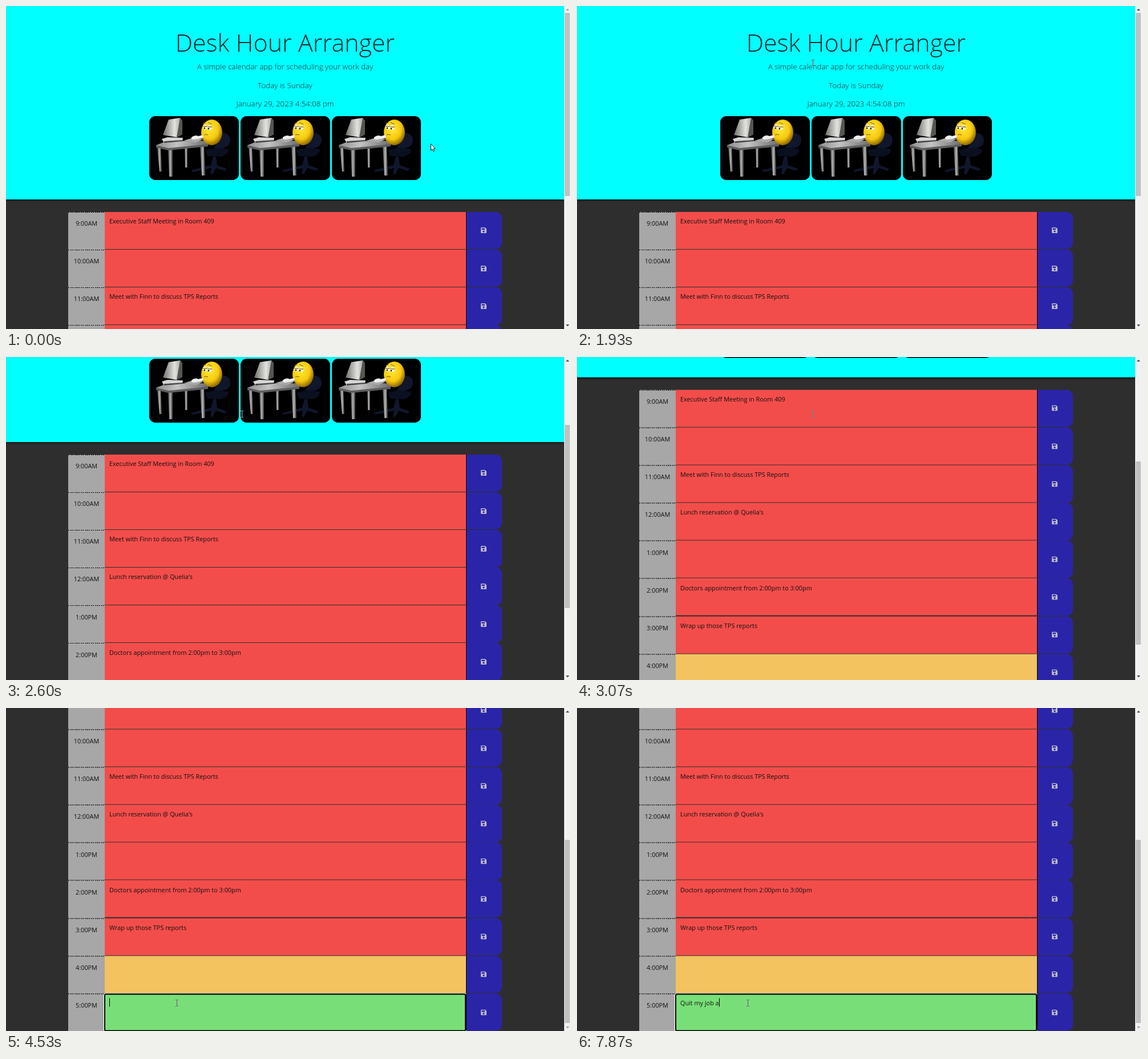
These frames come from a looping animation (990x566 px, 8000 ms). An HTML page:

```html
<!DOCTYPE html>
<html lang="en">
<head>
<meta charset="utf-8">
<title>Day planner</title>
<style>
  html, body { margin: 0; width: 100%; height: 100%; overflow: hidden; background: #2e2e2e; }
  #stage { position: relative; width: 990px; height: 566px; overflow: hidden; isolation: isolate;
    background: #2e2e2e; font: 10.85px/17px "Open Sans", "Noto Sans", sans-serif; color: #111; }
  #stage div, #stage svg { position: absolute; }
  #page { left: 0; top: 0; width: 978px; height: 956px; }
  #head { left: 0; top: 0; width: 978px; height: 339px; background: #0ff; text-align: center;
    box-shadow: 0 1px 4px #000c; color: #17242a; font-weight: 300; }
  #head div { width: 100%; white-space: pre; }
  .title { top: 34.3px; font-size: 43px; line-height: 60px; }
  .lead { font-size: 13.35px; line-height: 20px; }
  .pic { top: 193px; width: 156.5px; height: 112px; border-radius: 10.7px; background: #000; }
  .row { left: 109px; width: 760px; height: 66.14px; white-space: pre; }
  .hour { left: 0; top: 0; width: 64px; height: 100%; box-sizing: border-box; padding-top: 11.3px;
    background: repeating-linear-gradient(90deg, #000 0 2.2px, #0000 2.2px 3.6px) top / 100% 1px no-repeat #a7a7a7;
    text-align: center; }
  .note { left: 64px; top: 0; width: 633px; height: 65.1px; box-sizing: border-box; padding: 7.3px 8px; }
  .ring { left: 63px; top: 0; width: 634px; height: 66px; box-sizing: border-box;
    border: 2px solid #000; border-radius: 3px; box-shadow: 0 0 0 1px #fff; }
  .save { left: 697px; top: 0; width: 63px; height: 65.6px; box-sizing: border-box;
    background: #2a25a8; border-left: 1px solid #000; border-radius: 2px 10.7px 10.7px 2px; }
  .save svg { left: 25px; top: 27.8px; }
  .caret { position: absolute; width: 1px; height: 15px; margin-top: 1px; background: #000; }
  #bar { left: 978px; top: 0; width: 12px; height: 566px; background: #f1f1f1; }
  #thumb { left: 1.2px; width: 9.3px; height: 321px; background: #c1c1c1; }
  #bar svg { left: 0; top: 0; }
  .cursor { left: 0; top: 0; overflow: visible; }
  #beam { mix-blend-mode: difference; }
</style>
</head>
<body>
<div id="stage">
  <div id="page">
    <div id="head">
      <div class="title">Desk Hour Arranger</div>
      <div class="lead" style="top:95.7px">A simple calendar app for scheduling your work day</div>
      <div class="lead" style="top:128.5px">Today is Sunday</div>
      <div class="lead" style="top:161.3px">January 29, 2023 4:54:08 pm</div>
    </div>
  </div>
  <div id="bar">
    <div id="thumb"></div>
    <svg width="12" height="566"><path id="up" d="M3 8L6 4.6L9 8Z"/><path id="down" d="M3 558L6 561.4L9 558Z"/></svg>
  </div>
  <svg class="cursor" id="arrow" width="10" height="16">
    <path d="M.5 .5V12L3 9.7L4.8 13.8L6.6 13L4.9 9H8.2Z" fill="#fff" stroke="#000" stroke-width=".9"/>
  </svg>
  <svg class="cursor" id="beam" width="1" height="1">
    <path d="M-2.5 -5.5H-.5M.5 -5.5H2.5M0 -5V5M-2.5 5.5H-.5M.5 5.5H2.5" fill="none" stroke="#fff" stroke-opacity=".8"/>
  </svg>
</div>

<svg width="0" height="0" style="position:absolute">
  <defs>
    <radialGradient id="skin" cx=".4" cy=".35" r=".7">
      <stop offset="0" stop-color="#ffe93a"/><stop offset=".6" stop-color="#f6c90e"/><stop offset="1" stop-color="#7a5600"/>
    </radialGradient>
    <linearGradient id="leg">
      <stop offset="0" stop-color="#444"/><stop offset=".5" stop-color="#b5b5b5"/><stop offset="1" stop-color="#333"/>
    </linearGradient>
    <linearGradient id="top">
      <stop offset="0" stop-color="#8c8c8c"/><stop offset=".4" stop-color="#c4c4c4"/><stop offset="1" stop-color="#6a6a6a"/>
    </linearGradient>
    <linearGradient id="case">
      <stop offset="0" stop-color="#6f6f6c"/><stop offset=".6" stop-color="#e2e2de"/><stop offset="1" stop-color="#999"/>
    </linearGradient>
    <g id="desk">
      <g fill="#10162c">
        <path d="M122 30Q141 27 142 42Q142 54 128 56L112 59L118 48Z"/>
        <path d="M98 60Q118 52 138 58Q141 66 126 71L102 70Z" fill="#0b1020"/>
        <path d="M112 71H117L119 86L136 92L133 96L117 91L111 102L107 101L109 91L76 98L73 95L108 86Z"/>
      </g>
      <g fill="url(#leg)">
        <path d="M14 54H20L22 97H18Z"/><path d="M62 55H67L67 90H63Z"/>
        <path d="M33 57H41L41 106H35Z"/><path d="M89 53H96L98 104H92Z"/>
      </g>
      <path d="M12 51L30 44L104 43L103 53L34 60L12 55Z" fill="#5e5e5e"/>
      <path d="M12 51L30 44L104 43L103 49L34 56Z" fill="url(#top)"/>
      <path d="M22 40L32 37L59 38L58 44L26 47Z" fill="#d6d6d6"/>
      <path d="M26 44L58 42V44L26 47Z" fill="#444"/>
      <path d="M34 6L54 3L58 8L58 32L48 37L24 33Z" fill="url(#case)"/>
      <path d="M54 3L58 8L58 32L48 37Z" fill="#55564f"/>
      <path d="M60 43L76 38L95 40L82 46Z" fill="#aaa"/>
    </g>
    <g id="face">
      <ellipse cx="109.500" cy="28.500" rx="18.500" ry="22.500" fill="url(#skin)"/>
      <ellipse cx="98" cy="19" rx="3.500" ry="4" fill="#fff"/><ellipse cx="106" cy="20" rx="4" ry="4" fill="#fff"/>
      <path d="M94.500 18H101.500M102.500 19H110" stroke="#8a6200" stroke-width="1.500"/>
      <circle cx="97" cy="21" r="1.300"/><circle cx="104" cy="22" r="1.300"/>
      <path d="M94 13L99 11M103 11L110 14M96 33Q99 31 103 33" fill="none" stroke="#7a5600"/>
    </g>
    <path id="hand" d="M74 37Q80 32 86 35L94 33Q97 37 91 39L78 41Q73 41 74 37Z" fill="#eee"/>
  </defs>
</svg>

<script>
const $ = id => document.getElementById(id);
const LOOP = 8000, STEP = 200 / 3, MAX_SCROLL = 389.5;
const RED = '#f34d4b', YELLOW = '#f2c35f', GREEN = '#78df78';

const rows = [
  ['9:00AM', 'Executive Staff Meeting in Room 409'],
  ['10:00AM', ''],
  ['11:00AM', 'Meet with Finn to discuss TPS Reports'],
  ['12:00AM', "Lunch reservation @ Quelia's"],
  ['1:00PM', ''],
  ['2:00PM', 'Doctors appointment from 2:00pm to 3:00pm'],
  ['3:00PM', 'Wrap up those TPS reports'],
  ['4:00PM', '', YELLOW],
  ['5:00PM', '<span id="typed"></span><span class="caret" id="caret"></span>', GREEN]
];
const disk = `<svg width="10" height="10"><path fill="#bdbacb" fill-rule="evenodd"
  d="M1 0H7.500L10 2.500V9Q10 10 9 10H1Q0 10 0 9V1Q0 0 1 0ZM1.500 1.500H7V4H1.500ZM5 5.300A1.600 1.600 0 0 0 5 8.500A1.600 1.600 0 0 0 5 5.300Z"/></svg>`;

const pics = [251, 411, 570.5].map(x => `<svg class="pic" style="left:${x}px">
  <use href="#desk"/><use class="head" href="#face"/><use class="hands" href="#hand"/></svg>`);
const list = rows.map(([hour, note, color = RED], i) => `<div class="row" style="top:${360.7 + i * 66.14}px">
  <div class="hour">${hour}</div><div class="note" style="background:${color}">${note}</div>
  ${i === 8 ? '<div class="ring" id="ring"></div>' : ''}<div class="save">${disk}</div></div>`);
$('page').insertAdjacentHTML('beforeend', pics.join('') + list.join(''));

const heads = document.querySelectorAll('.head'), hands = document.querySelectorAll('.hands');

// Keys are [time, value, ...]
const scrollKeys = [[1933, 0], [2067, 30], [2600, 190], [3067, 303.5], [3200, 355.5],
  [3333, 355.5], [3400, 366], [3467, 382], [3533, 387.5], [3600, MAX_SCROLL]];
const mouseKeys = [[0, 744, 241], [200, 660, 190], [400, 520, 136], [600, 370, 150], [867, 268, 230],
  [1000, 190, 240], [1130, 270, 324], [1270, 560, 318], [1400, 760, 220], [1530, 640, 110],
  [1670, 450, 90], [1733, 414, 100], [3800, 414, 100], [3933, 408, 140], [4133, 350, 370],
  [4267, 306, 500], [4333, 300, 517]];
const text = 'Quit my job a';
const keyTimes = [5470, 5730, 5870, 6000, 6070, 6270, 6470, 6530, 7070, 7200, 7730, 7800, 7870];

function at(keys, t) {
  const i = keys.findIndex(k => k[0] > t);
  if (i === 0) return keys[0].slice(1);
  if (i < 0) return keys[keys.length - 1].slice(1);
  const a = keys[i - 1], b = keys[i], p = (t - a[0]) / (b[0] - a[0]);
  return a.slice(1).map((v, n) => v + (b[n + 1] - v) * p);
}

function draw(now) {
  // The screen refreshes in even steps
  const t = Math.floor((now % LOOP + 5) / STEP) * STEP;
  const [scroll] = at(scrollKeys, t);
  $('page').style.transform = `translateY(${-scroll}px)`;
  $('thumb').style.top = 12 + scroll * 0.563 + 'px';
  $('up').setAttribute('fill', scroll > 0 ? '#505050' : '#a3a3a3');
  $('down').setAttribute('fill', scroll < MAX_SCROLL ? '#505050' : '#a3a3a3');

  const [x, y] = at(mouseKeys, t);
  const onText = t > 1650 || (y > 128 && y < 150 && x > 440 && x < 538);
  $('arrow').style.display = onText ? 'none' : '';
  $('beam').style.display = onText ? '' : 'none';
  $('arrow').style.transform = `translate(${x}px,${y}px)`;
  $('beam').style.transform = `translate(${Math.round(x) - 0.5}px,${Math.round(y)}px)`;

  const bob = Math.sin(Math.PI * t / 965) ** 2;
  heads.forEach(h => h.setAttribute('transform', `translate(0 ${-1.5 * bob})`));
  hands.forEach(h => h.setAttribute('transform', `translate(0 ${bob})`));

  $('ring').style.display = t > 4460 ? '' : 'none';
  $('typed').textContent = text.slice(0, keyTimes.filter(k => k <= t + 5).length);
  $('caret').style.display = t > 4525 && (t < 4995 || t > 5460) ? '' : 'none';
}

let start;
function tick(now) {
  start ??= now;
  draw(now - start);
  requestAnimationFrame(tick);
}
draw(0);
requestAnimationFrame(tick);
</script>
</body>
</html>
```
